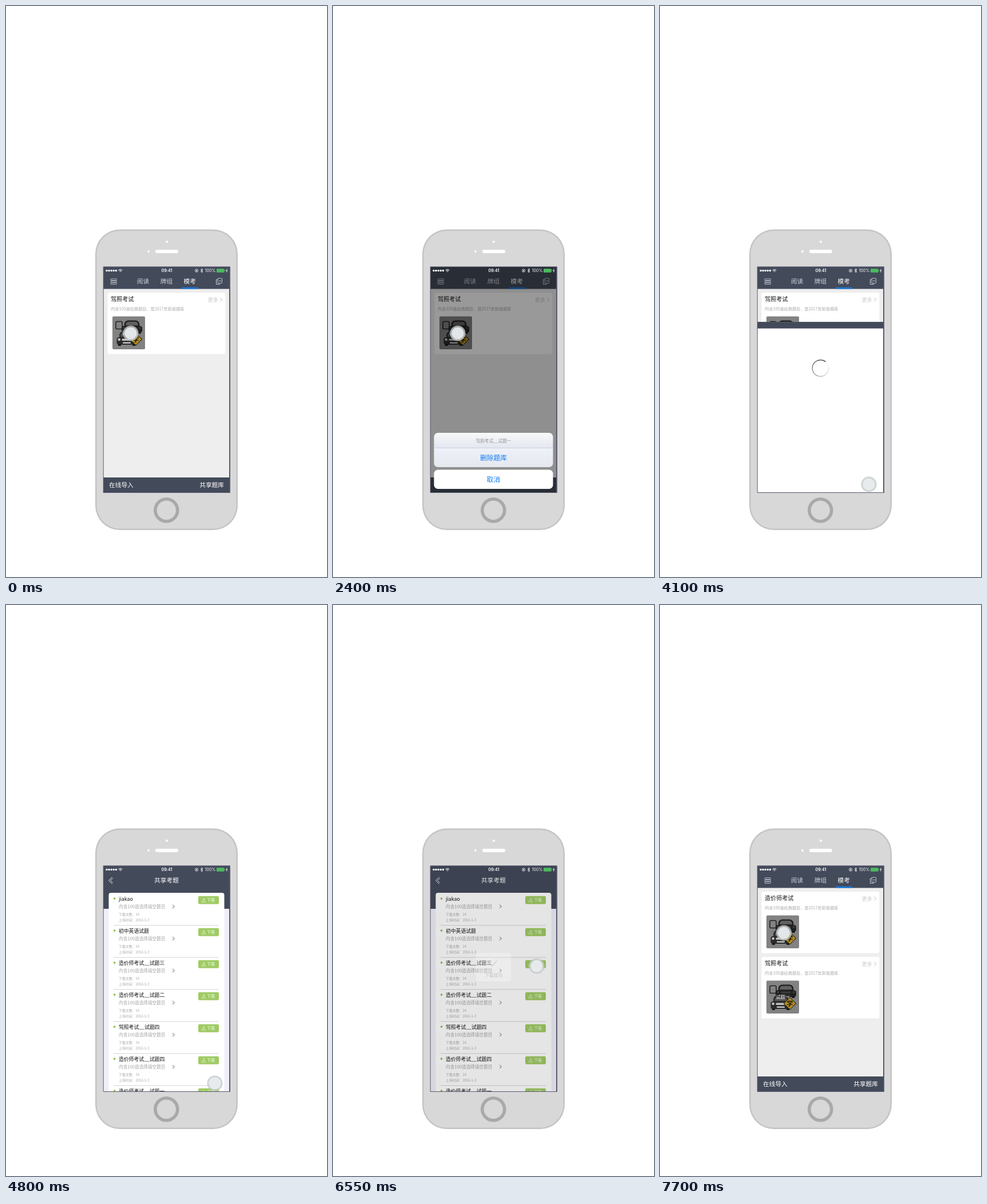
Write an HTML page with a canvas that moves like this. It is 561 px wide and 998 px high and loops after 8000 ms.

```html
<!DOCTYPE html>
<html lang="zh-CN">
<head>
<meta charset="utf-8">
<title>题库管理</title>
<style>
html, body { margin: 0; width: 561px; height: 998px; overflow: hidden; background: #fff; }
canvas { display: block; }
</style>
</head>
<body>
<canvas id="stage" width="561" height="998"></canvas>
<script>
const ctx = document.getElementById('stage').getContext('2d');
const LOOP = 8000;
const FRAME = 50;
const CJK = '"Noto Sans CJK SC", "Noto Sans CJK", "Noto Sans", sans-serif';
const LATIN = 'Inter, sans-serif';
const BAR = '#434a5a';
const SCREEN = { x: 170, y: 456, w: 221, h: 395 };
const MID = 280.5;
const SHEET_H = 104;
const LIST_READY = 4650;

const clamp = v => Math.max(0, Math.min(1, v));
const mix = (a, b, p) => a + (b - a) * p;
const span = (t, from, to) => clamp((t - from) / (to - from));
const smooth = p => p * p * (3 - 2 * p);
const easeOut = p => 1 - (1 - p) ** 2;
const spring = ms => ms <= 0 ? 0 : 1 - Math.exp(-ms * 0.0182) * (1 + ms * 0.0182);

function rect(x, y, w, h, color) {
  ctx.fillStyle = color;
  ctx.fillRect(x, y, w, h);
}

function round(x, y, w, h, r, color) {
  ctx.beginPath();
  ctx.roundRect(x, y, w, h, r);
  ctx.fillStyle = color;
  ctx.fill();
}

function frame(x, y, w, h, r, color, width) {
  ctx.beginPath();
  ctx.roundRect(x, y, w, h, r);
  ctx.strokeStyle = color;
  ctx.lineWidth = width;
  ctx.stroke();
}

function disc(x, y, r, color) {
  ctx.beginPath();
  ctx.arc(x, y, r, 0, Math.PI * 2);
  ctx.fillStyle = color;
  ctx.fill();
}

function line(points, color, width = 1) {
  ctx.beginPath();
  points.forEach(([x, y]) => ctx.lineTo(x, y));
  ctx.strokeStyle = color;
  ctx.lineWidth = width;
  ctx.stroke();
}

function text(str, x, y, size, color, { align = 'left', weight = 400, font = CJK } = {}) {
  ctx.font = `${weight} ${size}px ${font}`;
  ctx.textAlign = align;
  ctx.fillStyle = color;
  ctx.fillText(str, x, y + size * 0.37);
}

// A negative size points left.
function chevron(x, y, size, color, width) {
  const rise = Math.abs(size);
  line([[x - size / 2, y - rise], [x + size / 2, y], [x - size / 2, y + rise]], color, width);
}

function gradient(top, height, from, to) {
  const fill = ctx.createLinearGradient(0, top, 0, top + height);
  fill.addColorStop(0, from);
  fill.addColorStop(1, to);
  return fill;
}

function shade(alpha) {
  rect(SCREEN.x, SCREEN.y, SCREEN.w, SCREEN.h, `rgba(0,0,0,${0.4 * alpha})`);
}

function drawPhone() {
  round(156, 390.5, 249, 525.5, 43, '#c4c4c4');
  round(158.5, 393, 244, 520.5, 40.5, '#d8d8d8');
  disc(281, 412, 2, '#fff');
  disc(249, 429, 2, '#fff');
  round(261, 426, 40, 6, 3, '#fff');
  disc(280.3, 881.3, 22.3, '#a9a9a9');
  disc(280.3, 881.3, 16.7, '#d8d8d8');
}

function drawStatus() {
  const y = 462.5;
  for (let i = 0; i < 5; i++) disc(176 + i * 4.1, y, 1.7, '#fff');
  ctx.strokeStyle = '#fff';
  ctx.lineWidth = 1;
  for (let r = 1; r < 5; r += 1.9) {
    ctx.beginPath();
    ctx.arc(200, y + 2.8, r, -Math.PI * 0.76, -Math.PI * 0.24);
    ctx.stroke();
  }
  text('09:41', 281, y, 7.2, '#fff', { align: 'center', weight: 600, font: LATIN });
  frame(330.5, y - 2.6, 5.2, 5.2, 2.6, '#fff', 0.8);
  rect(332, y - 0.8, 2, 1.8, '#fff');
  line([[342, y - 3.5], [342, y + 3.5]], '#fff', 0.8);
  for (const side of [-1, 1]) {
    line([[340, y - 2 * side], [344, y + 1.8 * side], [342, y + 3.5 * side]], '#fff', 0.8);
  }
  text('100%', 366.3, y, 7, '#fff', { align: 'right', font: LATIN });
  round(368, y - 3.2, 13.5, 6.4, 1, '#4cba61');
  rect(382, y - 1.2, 1, 2.4, '#4cba61');
  line([[386.2, y - 3], [384.8, y + 0.3], [386.8, y - 0.3], [385.4, y + 3]], '#fff', 0.9);
}

function drawCar(cx, top, w, h, body, glass, trim) {
  const left = cx - w / 2;
  round(left + w * 0.13, top, w * 0.74, h * 0.6, [w * 0.2, w * 0.2, 0, 0], body);
  round(left + w * 0.2, top + h * 0.1, w * 0.6, h * 0.28, [w * 0.14, w * 0.14, 0, 0], glass);
  round(left, top + h * 0.42, w, h * 0.52, 4, body);
  round(cx - w * 0.24, top + h * 0.52, w * 0.48, h * 0.14, 1, trim);
  round(cx - w * 0.2, top + h * 0.76, w * 0.4, h * 0.1, 1, trim);
  for (const side of [-1, 1]) {
    disc(cx + side * w * 0.38, top + h * 0.58, h * 0.09, trim);
    rect(cx + side * w * 0.36 - 2.5, top + h * 0.9, 5, h * 0.12, '#191919');
  }
}

function drawThumb(x, y) {
  ctx.save();
  ctx.translate(x, y);
  round(0, 0, 57, 57.5, 2, '#828282');
  frame(6, 9, 11, 13, 2, '#222', 1.6);
  drawCar(34, 7, 36, 23, '#1f1f1f', '#606060', '#3c3c3c');
  drawCar(25, 26, 35, 25, '#2b2b2b', '#565656', '#c4c4c4');
  ctx.translate(41, 40);
  ctx.rotate(Math.PI / 4);
  round(-8, -8, 16, 16, 1, '#242117');
  round(-7, -7, 14, 14, 1, '#b78f20');
  ctx.rotate(-Math.PI / 4);
  text('学', 0, 0, 11, '#17150c', { align: 'center', weight: 700 });
  text('试题一', -12.5, -11, 8, '#eee', { align: 'center' });
  ctx.restore();
}

function drawCard(y, title) {
  round(177.5, y, 205.8, 107.5, 3, '#fff');
  text(title, 183, y + 11.7, 10.1, '#111', { weight: 500 });
  text('内含100道经典题目、是2017年新版题库', 183, y + 28.3, 7.2, '#aaa');
  text('更多', 371, y + 12.2, 9.2, '#c9c9c9', { align: 'right' });
  chevron(376, y + 12, 3.3, '#bbb', 1);
  drawThumb(186, y + 41.5);
}

function drawHome(t) {
  const { x, y, w, h } = SCREEN;
  rect(x, y, w, h, '#eeeeee');
  rect(x, y, w, 38.5, BAR);
  for (let i = 0; i < 3; i++) frame(183, 476.8 + i * 3.5, 10.5, 2.6, 1, '#d6d8dd', 0.8);
  ['阅读', '牌组', '模考'].forEach((tab, i) => {
    text(tab, 239.5 + i * 40.9, 481.3, 10.7, i === 2 ? '#fff' : '#d0d2d7', { align: 'center' });
  });
  rect(307, 491.7, 29, 2.8, '#1976d8');
  line([[369.5, 478], [367.5, 478], [367.5, 486.5], [374, 486.5]], '#d6d8dd', 0.9);
  frame(370, 476, 7.5, 8.5, 1, '#d6d8dd', 0.9);
  line([[372, 480.5], [376, 480.5]], '#d6d8dd', 0.9);

  const cards = t < 6000 ? ['驾照考试'] : ['造价师考试', '驾照考试'];
  cards.forEach((title, i) => drawCard(501 + i * 114, title));
  rect(x, 824, w, 27, BAR);
  text('在线导入', 180, 837.2, 10.7, '#fff');
  text('共享题库', 381, 837.2, 10.7, '#fff', { align: 'right' });
}

function drawSheet(t) {
  const shown = easeOut(span(t, 1962, 2400)) * (1 - smooth(span(t, 2980, 3206)));
  if (!shown) return;
  shade(shown);
  const top = 850 - SHEET_H * shown;
  const center = { align: 'center' };
  round(176.5, top, 208, 26, [7, 7, 0, 0], gradient(top, 26, '#f8f8f9', '#e4e7f1'));
  round(176.5, top + 26, 208, 34, [0, 0, 7, 7], gradient(top + 26, 34, '#eef1f8', '#e6e8ef'));
  rect(176.5, top + 26, 208, 0.8, '#c3c8d4');
  text('驾照考试__试题一', MID, top + 13.8, 7.6, '#929296', center);
  text('删除题库', MID, top + 43.5, 11.8, '#127df5', center);
  round(176.5, top + 64.5, 208, 33.6, 7, '#fff');
  text('取消', MID, top + 81.3, 11.8, '#127df5', center);
}

function drawSpinner(x, y, r, t) {
  const head = -0.9 + (t - 4100) / 1000 * Math.PI * 2;
  const steps = 48;
  const step = Math.PI * 2 / steps;
  ctx.lineWidth = 1.2;
  for (let i = 0; i < steps; i++) {
    ctx.beginPath();
    ctx.arc(x, y, r, head - (i + 1.1) * step, head - i * step);
    ctx.strokeStyle = `rgba(20,20,20,${0.95 * (1 - i / steps) ** 1.2})`;
    ctx.stroke();
  }
}

const EXAMS = ['jiakao', '初中英语试题', '造价师考试__试题三', '造价师考试__试题二',
  '驾照考试__试题四', '造价师考试__试题四', '造价师考试__试题一'];

function drawDownload(y) {
  const ink = '#e8f3d8';
  round(336, y - 7, 36, 14, 2.5, '#9fcb64');
  line([[345.5, y - 4], [345.5, y + 1]], ink, 0.9);
  line([[343.5, y - 1], [345.5, y + 1], [347.5, y - 1]], ink, 0.9);
  line([[342.5, y + 1], [342.5, y + 3.5], [348.5, y + 3.5], [348.5, y + 1]], ink, 0.8);
  text('下载', 351, y, 7, '#f6faef');
}

function drawExam(title, i) {
  const y = 514 + i * 56;
  rect(188, y - 2.5, 3.2, 3.2, '#8fc24a');
  text(title, 197, y, 8.8, '#111');
  text('内含100道选择填空题目', 197, y + 13.2, 7.65, '#a5a5a5');
  chevron(292.7, y + 13, 3.2, '#999', 1.2);
  text('下载次数：14', 197, y + 26.5, 5.9, '#a8a8a8');
  text('上传时间：2016-1-3', 197, y + 36.5, 5.9, '#a8a8a8');
  rect(188, y + 45.5, 184, 0.9, '#cfcfd3');
  drawDownload(y + 1.7);
}

function drawList() {
  const { x, y, w, h } = SCREEN;
  rect(x, y, w, h, '#efeff8');
  rect(x, y, w, 75, BAR);
  chevron(182.5, 481.5, -6, '#fff', 0.9);
  chevron(184.7, 481.5, -4, '#fff', 0.9);
  text('共享考题', MID, 481.3, 10.7, '#fff', { align: 'center' });
  round(179.5, 503, 202, 360, 4, '#fff');
  EXAMS.forEach(drawExam);
}

function drawPage(t) {
  const { x, y, w, h } = SCREEN;
  const up = spring(t - 3950) * (1 - smooth(span(t, 6860, 7160)));
  if (!up) return;
  const loading = t < LIST_READY;
  ctx.save();
  ctx.translate(0, h * (1 - up));
  if (loading) {
    rect(x, y, w, h, '#fff');
    rect(x, y, w, 11.5, BAR);
  } else {
    drawList();
  }
  ctx.restore();
  if (loading) drawSpinner(MID, 633, 14.3, t);
}

function drawHud(t) {
  const shown = span(t, 5650, 5850);
  const gone = span(t, 6400, 6600);
  const alpha = shown * (1 - gone);
  if (!alpha) return;
  shade(alpha);
  const scale = mix(1.3, 1, shown) * mix(1, 0.8, gone);
  const done = t >= 5900;
  ctx.save();
  ctx.globalAlpha = alpha;
  ctx.translate(MID, 633);
  ctx.scale(scale, scale);
  round(-36.3, -29.5, 72.6, 59, 6, '#fff');
  ctx.globalAlpha = alpha * 0.75;
  if (done) line([[-6, -7], [-2, -2.5], [7, -13]], '#222', 1.2);
  else drawSpinner(0, -7.5, 10.6, t);
  text(done ? '下载成功' : '下载中', 0, 17, 9.2, '#222', { align: 'center' });
  ctx.restore();
}

const GLIDES = [
  { from: 2450, to: 2900, x: 293.5, y: 830 },
  { from: 3300, to: 3850, x: 365, y: 836 },
  { from: 4850, to: 5450, x: 356, y: 631 },
  { from: 6600, to: 6820, x: 183, y: 482 },
  { from: 7180, to: 7680, x: 216.5, y: 573 },
];

function drawTouch(t) {
  let x = 218, y = 572;
  for (const glide of GLIDES) {
    const p = smooth(span(t, glide.from, glide.to));
    x = mix(x, glide.x, p);
    y = mix(y, glide.y, p);
  }
  disc(x, y, 13.6, 'rgba(196,202,204,0.8)');
  disc(x, y, 10.6, 'rgba(234,238,240,0.88)');
}

function draw(t) {
  const { x, y, w, h } = SCREEN;
  rect(0, 0, 561, 998, '#fff');
  drawPhone();
  ctx.save();
  ctx.beginPath();
  ctx.rect(x, y, w, h);
  ctx.clip();
  drawHome(t);
  drawSheet(t);
  drawPage(t);
  drawHud(t);
  drawStatus();
  drawTouch(t);
  ctx.restore();
  frame(x + 0.2, y - 0.2, w + 0.3, h - 0.3, 0, '#5a5a72', 1);
  rect(x + w - 1, y, 1.8, h, '#5a5a72');
}

function tick() {
  draw(Math.floor(performance.now() / FRAME) * FRAME % LOOP);
  requestAnimationFrame(tick);
}
tick();
</script>
</body>
</html>
```
